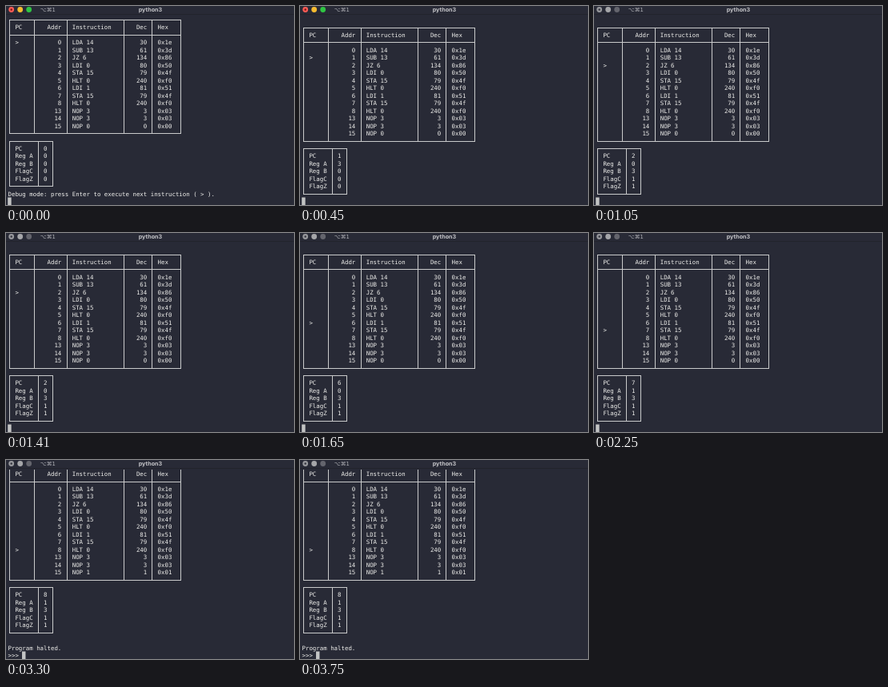
Recreate the animation shown at these times as an HTML page with a canvas. Size 360 by 249 pixels, loop 4.05 s.

```html
<!DOCTYPE html>
<html>
<head>
<meta charset="utf-8">
<style>
html, body { margin: 0; overflow: hidden; background: #282a36; }
canvas { display: block; }
</style>
</head>
<body>
<canvas id="screen" width="360" height="249"></canvas>
<script>
const ctx = document.getElementById('screen').getContext('2d');
const CELL = 4.455, LINE = 9.467, LEFT = 2.5, BOTTOM = 244.77, LOOP = 4050;
const PAPER = '#282a36', INK = '#efefec', RULE = '#c9cacb';

const program = [
  [0, 'LDA 14', 30], [1, 'SUB 13', 61], [2, 'JZ 6', 134], [3, 'LDI 0', 80],
  [4, 'STA 15', 79], [5, 'HLT 0', 240], [6, 'LDI 1', 81], [7, 'STA 15', 79],
  [8, 'HLT 0', 240], [13, 'NOP 3', 3], [14, 'NOP 3', 3], [15, 'NOP 0', 0]
];
const labels = ['PC', 'Reg A', 'Reg B', 'FlagC', 'FlagZ'];

// regs follow the order of labels; below holds the lines under the tables
const steps = [
  { at: 0, regs: [0, 0, 0, 0, 0], colour: true,
    below: ['Debug mode: press Enter to execute next instruction ( > ).', ''] },
  { at: 450, regs: [1, 3, 0, 0, 0], colour: true },
  { at: 1050, regs: [2, 0, 3, 1, 1] },
  { at: 1650, regs: [6, 0, 3, 1, 1] },
  { at: 2250, regs: [7, 1, 3, 1, 1] },
  { at: 2700, regs: [8, 1, 3, 1, 1], stored: 1 },
  { at: 3300, regs: [8, 1, 3, 1, 1], stored: 1, below: ['', 'Program halted.', '>>> '] }
];

const colX = col => LEFT + col * CELL;
const snap = v => Math.floor(v) + 0.5;

function write(text, col, y) {
  [...String(text)].forEach((ch, i) => {
    if (ch !== ' ') ctx.fillText(ch, colX(col + i), y + 2.4);
  });
}

const writeRight = (text, end, y) => write(text, end - String(text).length, y);

function grid(cols, rows) {
  const xs = cols.map(c => snap(colX(c + 0.5)));
  const ys = rows.map(snap);
  ctx.beginPath();
  for (const x of xs) {
    ctx.moveTo(x, ys[0]);
    ctx.lineTo(x, ys.at(-1));
  }
  for (const y of ys) {
    ctx.moveTo(xs[0] - 0.5, y);
    ctx.lineTo(xs.at(-1) + 0.5, y);
  }
  ctx.stroke();
}

function dot(x, r, fill) {
  ctx.fillStyle = fill;
  ctx.beginPath();
  ctx.arc(x, 4.5, r, 0, 7);
  ctx.fill();
}

function titleBar(colour) {
  ctx.fillStyle = PAPER;
  ctx.fillRect(0, 0, 360, 12);
  ctx.fillStyle = '#22232c';
  ctx.fillRect(0, 10, 360, 1);
  const lights = colour ? ['#fb5c56', '#f8bc30', '#2fc543'] : ['#96979b', '#a5a6a9', '#64656d'];
  lights.forEach((fill, i) => dot(6.7 + 11 * i, 3.4, fill));
  dot(6.7, 1.2, colour ? '#7a1512' : '#33343e');
  ctx.fillStyle = '#b2b3b8';
  ctx.font = '6.8px "DejaVu Sans", sans-serif';
  ctx.fillText('⌥⌘1', 42.8, 7);
  ctx.fillStyle = '#c4c4c8';
  ctx.font = 'bold 7.2px Inter, sans-serif';
  ctx.textAlign = 'center';
  ctx.fillText('python3', 180.4, 7);
  ctx.textAlign = 'left';
}

function draw({ regs, colour, stored = 0, below = [''] }) {
  const y = n => BOTTOM - LINE * (23 + below.length - 1 - n);
  ctx.textRendering = 'geometricPrecision';
  ctx.fillStyle = PAPER;
  ctx.fillRect(0, 0, 360, 249);
  ctx.strokeStyle = RULE;
  ctx.fillStyle = INK;
  ctx.font = '7.4px "DejaVu Sans Mono", monospace';

  grid([0, 7, 16, 32, 40, 48], [y(0), y(2), y(15)]);
  write('PC', 2, y(1));
  writeRight('Addr', 15, y(1));
  write('Instruction', 18, y(1));
  writeRight('Dec', 39, y(1));
  write('Hex', 42, y(1));
  program.forEach(([addr, code, dec], i) => {
    const row = y(3 + i);
    if (addr === 15) {
      code = 'NOP ' + stored;
      dec = stored;
    }
    if (addr === regs[0]) write('>', 2, row);
    writeRight(addr, 15, row);
    write(code, 18, row);
    writeRight(dec, 39, row);
    write('0x' + dec.toString(16).padStart(2, '0'), 42, row);
  });

  grid([0, 8, 12], [y(16), y(22)]);
  labels.forEach((label, i) => {
    write(label, 2, y(17 + i));
    write(regs[i], 10, y(17 + i));
  });

  below.forEach((text, i) => write(text, 0, y(23 + i)));
  ctx.fillStyle = '#c3c4c4';
  ctx.fillRect(colX(below.at(-1).length) - 0.3, 239.5, CELL, 9.5);
  titleBar(colour);
}

function tick() {
  const t = performance.now() % LOOP;
  draw(steps.findLast(step => step.at <= t));
  requestAnimationFrame(tick);
}
tick();
</script>
</body>
</html>
```
